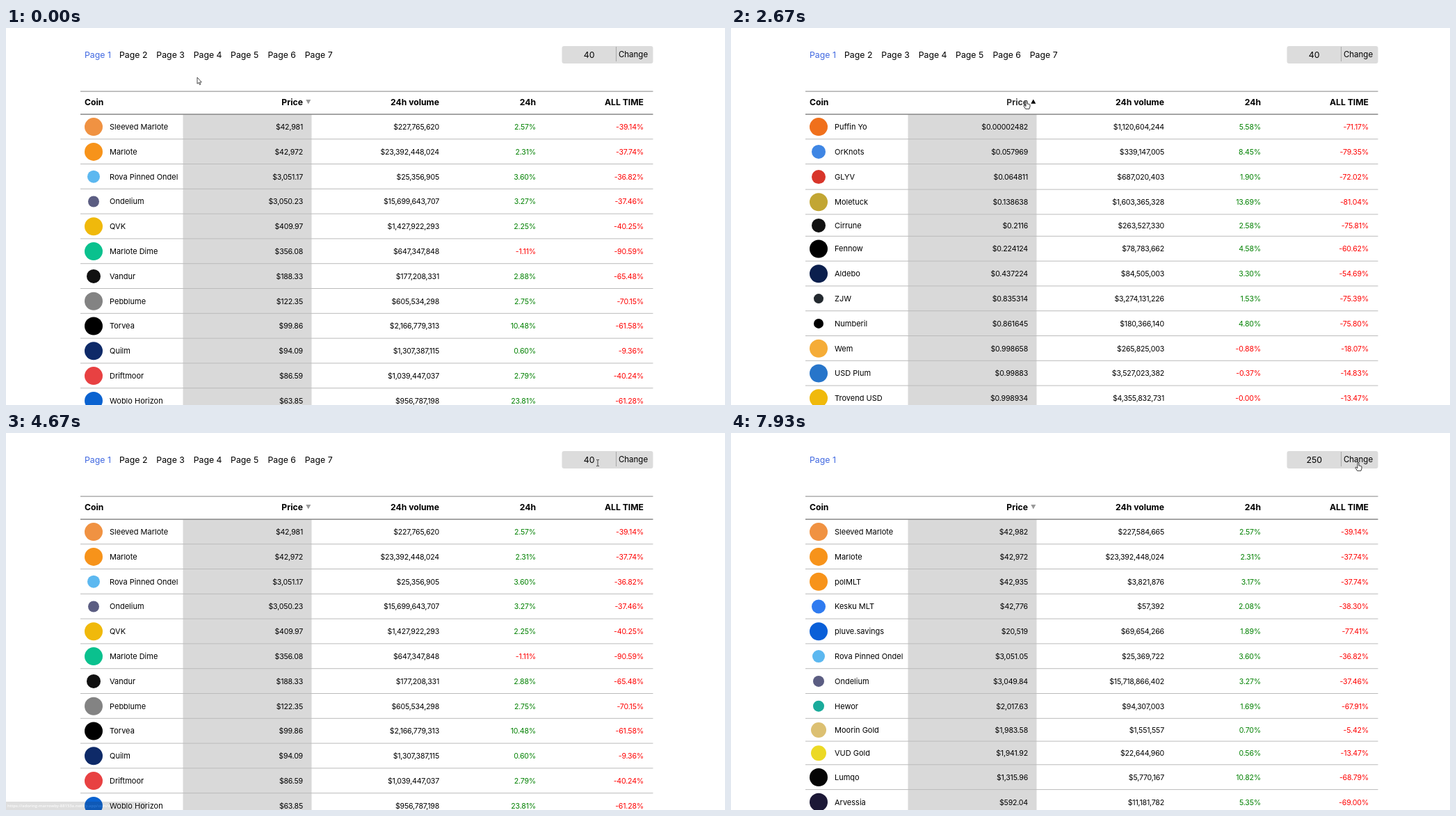
Write an HTML page that moves like this. It is 1034 by 542 pixels and loops after 8000 ms.

```html
<!DOCTYPE html>
<html lang="en">
<head>
<meta charset="utf-8">
<title>Coin table</title>
<style>
  html, body { margin: 0; width: 100%; height: 100%; overflow: hidden; background: #fff; }
  svg { display: block; width: 100%; height: 100%; }
  text { font-family: Inter, sans-serif; font-size: 12.3px; fill: #000; white-space: pre; }
  .name { font-size: 11px; }
  .num { font-size: 10.6px; letter-spacing: -.2px; text-anchor: end; }
  .head { font-size: 12.2px; font-weight: 700; }
  .right { text-anchor: end; }
  .mid { text-anchor: middle; }
  .up { fill: #008000; }
  .down { fill: #f00; }
  .url { font: 600 5.9px "Open Sans", sans-serif; fill: #e4e4e4; }
</style>
</head>
<body>
<svg id="stage" viewBox="0 0 1034 542"></svg>
<script>
const LOOP = 8000, STEP = 200 / 3, ROW = 35.8, TOP = 124;
const svg = document.getElementById('stage');

// name | icon colour | price | volume | 24h | all time | row height | icon radius
const tables = {
  desc: `Sleeved Marlote|#f09242|42,981|227,765,620|2.57|-39.14
Marlote|#f7931a|42,972|23,392,448,024|2.31|-37.74
Rova Pinned Ondel|#5cb8f0|3,051.17|25,356,905|3.60|-36.82||9
Ondelium|#5b5d82|3,050.23|15,699,643,707|3.27|-37.46||8
QVK|#f0b90b|409.97|1,427,922,293|2.25|-40.25
Marlote Dime|#0ac18e|356.08|647,347,848|-1.11|-90.59
Vandur|#111|188.33|177,208,331|2.88|-65.48||10
Pebblume|#838383|122.35|605,534,298|2.75|-70.15
Torvea|#000|99.86|2,166,779,313|10.48|-61.58
Quilm|#0e2a68|94.09|1,307,387,115|0.60|-9.36
Driftmoor|#e84142|86.59|1,039,447,037|2.79|-40.24
Woblo Horizon|#0a62d0|63.85|956,787,198|23.81|-61.28`,
  asc: `Puffin Yo|#f0701c|0.00002482|1,120,604,244|5.58|-71.17
OrKnots|#3f86e4|0.057969|339,147,005|8.45|-79.35||10
GLYV|#d8352a|0.064811|687,020,403|1.90|-72.02|36.6|10
Moletuck|#c2a633|0.138638|1,603,365,328|13.69|-81.04
Cirrune|#111|0.2116|263,527,330|2.58|-75.81|31.4|10
Fennow|#000|0.224124|78,783,662|4.58|-60.62
Aldebo|#0b1f4d|0.437224|84,505,003|3.30|-54.69
ZJW|#23292f|0.835314|3,274,131,226|1.53|-75.39||7
Numberil|#000|0.861645|180,366,140|4.80|-75.80||7
Wem|#f5ac37|0.998658|265,825,003|-0.88|-18.07
USD Plum|#2775ca|0.99883|3,527,023,382|-0.37|-14.83
Trovend USD|#f0b90b|0.998934|4,355,832,731|-0.00|-13.47`,
  full: `Sleeved Marlote|#f09242|42,982|227,584,665|2.57|-39.14
Marlote|#f7931a|42,972|23,392,448,024|2.31|-37.74
polMLT|#f7931a|42,935|3,821,876|3.17|-37.74
Kesku MLT|#2f7bf0|42,776|57,392|2.08|-38.30||10
pluve.savings|#0a5fd8|20,519|69,654,266|1.89|-77.41
Rova Pinned Ondel|#5cb8f0|3,051.05|25,369,722|3.60|-36.82||9
Ondelium|#5b5d82|3,049.84|15,718,866,402|3.27|-37.46||8
Hewor|#1aab9b|2,017.63|94,307,003|1.69|-67.91||8
Moorin Gold|#dcc072|1,983.58|1,551,557|0.70|-5.42|32.8|11
VUD Gold|#ecd924|1,941.92|22,644,960|0.56|-13.47|33.7|11
Lumqo|#050505|1,315.96|5,770,167|10.82|-68.79
Arvessia|#1c1836|592.04|11,181,782|5.35|-69.00`
};

function el(tag, attrs, parent = svg, content) {
  const node = document.createElementNS('http://www.w3.org/2000/svg', tag);
  for (const key in attrs) node.setAttribute(key, attrs[key]);
  if (content !== undefined) node.textContent = content;
  return parent.appendChild(node);
}
const group = () => el('g', {});
const text = (x, y, cls, str, parent) => el('text', { x, y, class: cls }, parent, str);
const rect = (x, y, width, height, fill, parent) => el('rect', { x, y, width, height, fill }, parent);
const show = (node, on) => node.setAttribute('visibility', on ? 'visible' : 'hidden');

// Top bar
text(113, 42.6, '', 'Page 1').style.fill = '#4169e1';
const pages = group();
for (let i = 0; i < 6; i++) text(163 + i * 53.35, 42.6, '', 'Page ' + (i + 2), pages);
rect(799.5, 26, 131, 25, '#dcdcdc').setAttribute('rx', 3);
rect(877, 27, 1, 21, '#a8a8a8');
text(902, 41.6, 'mid', 'Change').style.fontSize = '11.5px';
const marked = rect(831, 30, 15, 17, '#3390ff');
const field = text(838.7, 42.6, 'mid', '40');
const caret = rect(845, 30, 1, 17, '#000');

// Table
rect(254.5, TOP, 185, 418, '#d9d9d9');
const hover = group();
rect(107, TOP, 823.5, ROW, '#e6e6e6', hover);
rect(254.5, TOP, 185, ROW, '#c4c4c4', hover);
rect(107, 90.5, 823.5, 1.2, '#999');
text(113, 111, 'head', 'Coin');
const priceHead = text(427, 111, 'head right', 'Price');
text(623, 111, 'head right', '24h volume');
text(762, 111, 'head right', '24h');
text(917, 111, 'head right', 'ALL TIME');
const arrow = el('path', {});

function buildTable(source) {
  const g = group();
  let y = TOP;
  for (const line of source.split('\n')) {
    const [name, fill, price, volume, day, all, height, r] = line.split('|');
    const h = +height || ROW, cy = y + h / 2, base = cy + 4;
    const percent = (x, v) => text(x, base, 'num ' + (v[0] === '-' ? 'down' : 'up'), v + '%', g);
    el('circle', { cx: 126, cy: cy + .2, r: r || 13, fill }, g);
    text(149, base, 'name', name, g);
    text(427, base, 'num', '$' + price, g);
    text(623, base, 'num', '$' + volume, g);
    percent(762, day);
    percent(917, all);
    y += h;
    rect(107, y - .6, 823.5, 1, '#bbb', g);
  }
  return g;
}
const views = {};
for (const key in tables) views[key] = buildTable(tables[key]);
rect(107, 123.3, 823.5, 1.5, '#888');

// Link status
const status = group();
rect(0, 530, 202, 12, '#2b2b2b', status);
text(2, 538.4, 'url', 'https://adoring-marrowby-88153a.netlify.app/coin/sleeved-marlote', status);

// Pointers, each with its hot spot at 0,0
const pointers = {
  arrow: el('path', { d: 'M0 0V9.2L2.1 7.4L3.5 10.6L4.9 10L3.5 6.9H6.3Z', fill: '#fff', stroke: '#222', 'stroke-width': .8 }),
  hand: el('path', {
    d: 'M-1 1Q0-.6 1 1V5L3.6 5.4L5 6.2V9L4 12.3H-1.4L-4 8.2Q-4.2 6.8-2.8 7.2L-1 8.6Z',
    fill: '#fff', stroke: '#222', 'stroke-width': .9, 'stroke-linejoin': 'round'
  }),
  beam: el('path', { d: 'M-2-4.5H-.6L0-4L.6-4.5H2M0-4V4M-2 4.5H-.6L0 4L.6 4.5H2', fill: 'none', stroke: '#333', 'stroke-width': .9 })
};

const path = [
  [0, 275, 71], [70, 281, 71], [130, 275, 73], [270, 261, 75], [400, 261, 75],
  [600, 228, 105], [730, 200, 132], [870, 190, 140], [1000, 190, 140], [1070, 187, 139],
  [1670, 187, 139], [1930, 240, 118], [2130, 330, 97], [2270, 390, 95], [2400, 420, 103],
  [2530, 422, 105], [2670, 425, 104], [2930, 425, 104], [3270, 350, 87], [3530, 270, 100],
  [3730, 222, 132], [3870, 222, 137], [4130, 235, 135], [4270, 350, 118], [4470, 680, 70],
  [4600, 830, 46], [4670, 851, 43], [4800, 853, 41], [5200, 834, 49.5], [7000, 834, 49.5],
  [7070, 839, 52], [7200, 862, 55], [7330, 890, 52], [7470, 902, 43], [7530, 902, 42]
];

function pointAt(t) {
  const i = path.findIndex(p => p[0] > t);
  if (i < 0) return path[path.length - 1].slice(1);
  const [t0, x0, y0] = path[i - 1], [t1, x1, y1] = path[i];
  const k = (t - t0) / (t1 - t0);
  return [x0 + (x1 - x0) * k, y0 + (y1 - y0) * k];
}

function statusOpacity(t) {
  if (t < 1070) return 0;
  if (t < 1130) return .6;
  if (t < 2000) return 1;
  if (t < 2070) return .15;
  if (t < 4000) return 0;
  if (t < 4670) return 1;
  return t < 4730 ? .15 : 0;
}

function render(t) {
  const between = (a, b) => t >= a && t < b;
  const [x, y] = pointAt(t);

  const view = between(2530, 3070) ? 'asc' : t >= 7930 ? 'full' : 'desc';
  for (const key in views) show(views[key], key === view);
  arrow.setAttribute('d', view === 'asc' ? 'M431.3 108.8H438.3L434.8 102.5Z' : 'M431.3 103H438.3L434.8 109.4Z');
  arrow.setAttribute('fill', view === 'asc' ? '#000' : '#999');

  const onRow = between(730, 1930) || between(3800, 4230);
  const onPrice = x > 396 && x < 440 && y > 92 && y < TOP;
  show(hover, onRow);
  priceHead.style.fill = onPrice ? '#333' : '#000';
  status.setAttribute('opacity', statusOpacity(t));
  show(pages, t < 7530);

  const value = t < 5670 ? '40' : t < 5800 ? '2' : t < 6530 ? '25' : '250';
  const selected = between(4930, 5670);
  const left = t < 5070 ? 838.5 : 831;
  field.textContent = value;
  field.style.fill = selected && t >= 5070 ? '#fff' : '#000';
  show(marked, selected);
  marked.setAttribute('x', left);
  marked.setAttribute('width', 846 - left);
  show(caret, between(4800, 4930) || between(5670, 6000) || between(6470, 7030));
  caret.setAttribute('x', value === '250' ? 849.5 : value === '2' ? 842 : 845.5);

  const inBar = y > 26 && y < 51 && x > 800 && x < 930;
  const kind = inBar ? (x < 877 ? 'beam' : 'hand') : onRow || onPrice ? 'hand' : 'arrow';
  for (const key in pointers) show(pointers[key], key === kind);
  pointers[kind].setAttribute('transform', `translate(${x.toFixed(1)} ${y.toFixed(1)})`);
}

const start = performance.now();
function tick(now) {
  const t = Math.max(0, now - start) % LOOP;
  // The picture advances fifteen times a second
  render(Math.round(Math.floor((t + 4) / STEP) * STEP / 10) * 10 % LOOP);
  requestAnimationFrame(tick);
}
render(0);
requestAnimationFrame(tick);
</script>
</body>
</html>
```
